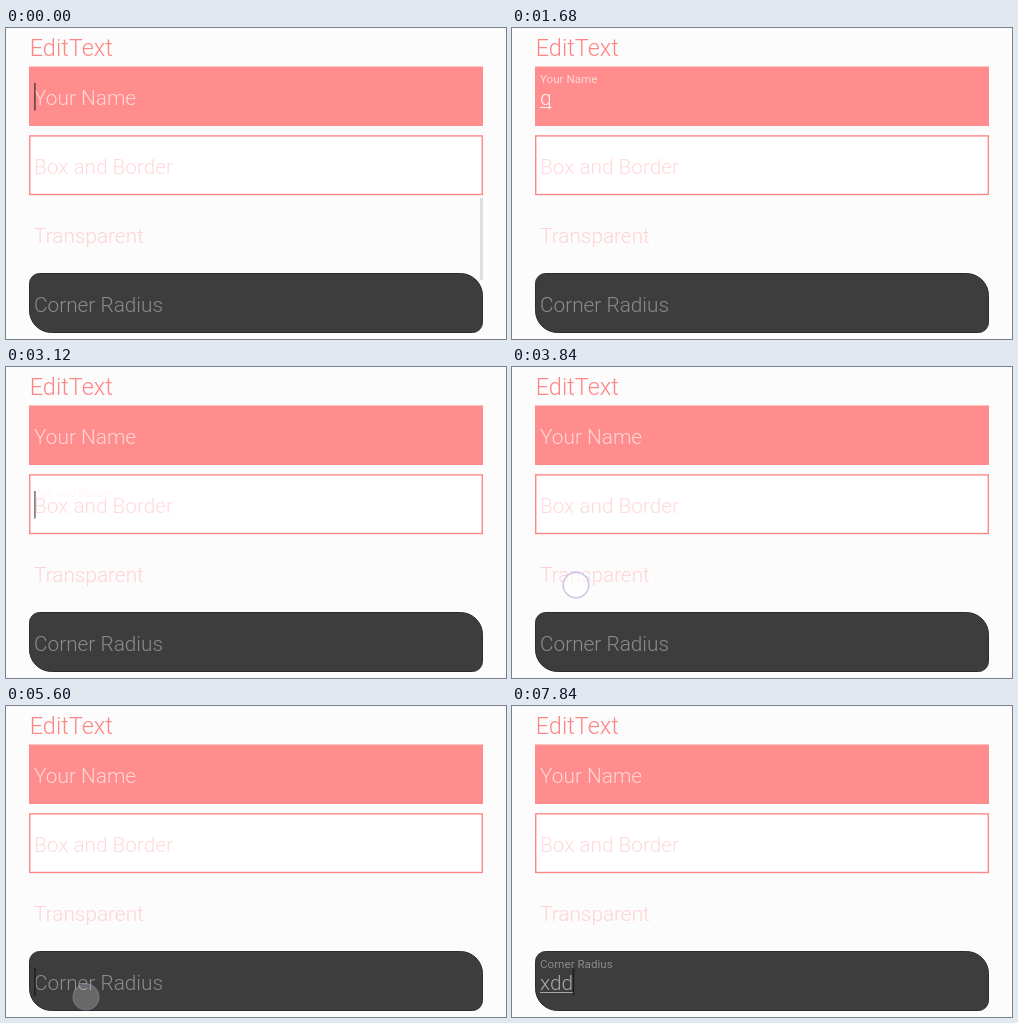
An HTML page that plays this animation: 500x311 px, repeating every 8 s.

```html
<!DOCTYPE html>
<html lang="en">
<head>
<meta charset="utf-8">
<title>EditText</title>
<style>
  html, body { margin: 0; width: 100%; height: 100%; overflow: hidden; background: #fcfcfc; }
  svg { display: block; width: 100vw; height: 100vh; }
  text { font-family: Roboto, sans-serif; font-weight: 300; font-size: 20.8px; }
  .title { font-size: 23.5px; fill: #ff8585; }
  .label { font-size: 11.6px; font-weight: 400; }
</style>
</head>
<body>
<svg id="stage" viewBox="0 0 500 311">
  <rect width="500" height="311" fill="#fcfcfc"/>
  <text class="title" x="23.7" y="27.5">EditText</text>
  <rect x="23" y="38.5" width="454" height="59.5" fill="#ff8d8d"/>
  <rect x="23.7" y="107.9" width="452.6" height="58.6" fill="#fff" stroke="#ff8787" stroke-width="1.4"/>
  <path d="M33.5 245.5H454.5a22 22 0 0 1 22 22V294.5a10 10 0 0 1 -10 10H45.500a22 22 0 0 1 -22 -22V255.500a10 10 0 0 1 10 -10Z"
        fill="#3d3d3d" stroke="#2c2c2c"/>
</svg>
<script>
const LOOP = 8000, STEP = 80, BLINK = 480, LABEL_MS = 320, TOUCH_MS = 320;
const LEFT = 28;
const stage = document.getElementById('stage');

function add(tag, attrs, content = '') {
  const el = document.createElementNS('http://www.w3.org/2000/svg', tag);
  set(el, attrs);
  el.textContent = content;
  stage.append(el);
  return el;
}

function set(el, attrs) {
  for (const key in attrs) el.setAttribute(key, attrs[key]);
}

const clamp = v => Math.max(0, Math.min(1, v));
const ease = v => 1 - (1 - v) ** 2;

const fields = [
  { hint: 'Your Name', base: 77, hintColor: '#ffd6d6', color: '#fff0f0', caret: '#4a3a3a' },
  { hint: 'Box and Border', base: 146, hintColor: '#ffd9dc', color: '#ff8d8d', caret: '#666' },
  { hint: 'Transparent', base: 215, hintColor: '#ffd2d5', color: '#ff8d8d', caret: '#666' },
  { hint: 'Corner Radius', base: 284, hintColor: '#8b8b8b', color: '#a8a8a8', caret: '#1c1c1c' }
];

for (const f of fields) {
  f.hintEl = add('text', { x: LEFT, y: f.base, fill: f.hintColor }, f.hint);
  f.labelEl = add('text', { class: 'label', x: LEFT, fill: f.hintColor }, f.hint);
  f.textEl = add('text', { x: LEFT, y: f.base, fill: f.color });
  f.lineEl = add('rect', { x: LEFT, y: f.base + 2, height: 1, fill: f.color });
}

const caret = add('rect', { width: 1.4, height: 27.5 });
const scrollbar = add('rect', { x: 474, y: 170, width: 3, height: 82, fill: '#dedede' });
const ring = add('circle', { r: 12.8, fill: '#fff', 'fill-opacity': 0.6, stroke: '#c9c5e6', 'stroke-width': 1.5 });

// [time, field, text]: every focus change or key press
const events = [
  [0, 0, ''], [1200, 0, 'q'], [1760, 0, ''],
  [2320, 1, ''], [2720, 1, 'x'], [3040, 1, ''],
  [4000, 2, ''], [4320, 2, 'x'], [4880, 2, ''],
  [5520, 3, ''], [5840, 3, 'x'], [6560, 3, 'xd'], [6720, 3, 'xdd'],
  [6880, 3, 'xddd'], [7200, 3, 'xdddd'], [7520, 3, 'xddd'], [7840, 3, 'xdd']
];

// [time, x, y]
const touches = [[2160, 63, 150], [3840, 64, 218], [5360, 80, 291]];

function drawField(f, i, t) {
  let text = '', shown = 0, changed = -LOOP;
  for (const [time, field, value] of events) {
    if (time > t || field !== i) continue;
    if (!text !== !value) changed = time;
    text = value;
  }
  const p = ease(clamp((t - changed + STEP) / LABEL_MS));
  shown = text ? p : changed < 0 ? 0 : 1 - p;
  f.hintEl.setAttribute('opacity', text ? 0 : 1);
  set(f.labelEl, { opacity: shown, y: f.base - 22 + 8 * (1 - shown) });
  f.textEl.textContent = text;
  f.width = text ? f.textEl.getComputedTextLength() : 0;
  f.lineEl.setAttribute('width', f.width);
}

function render(t) {
  fields.forEach((f, i) => drawField(f, i, t));

  const [time, active] = events.filter(e => e[0] <= t).pop();
  const f = fields[active];
  set(caret, {
    x: LEFT + f.width + (f.width ? -0.3 : 0.2),
    y: f.base - 22,
    fill: f.caret,
    opacity: (t - time) % (2 * BLINK) < BLINK ? 1 : 0
  });

  scrollbar.setAttribute('opacity', 1 - clamp((t - STEP) / 480));

  const touch = touches.find(([start]) => t >= start && t < start + TOUCH_MS);
  ring.setAttribute('opacity', 0);
  if (touch) {
    const [start, cx, cy] = touch;
    set(ring, { cx, cy, opacity: 1 - clamp((t - start - STEP) / (TOUCH_MS - STEP)) * 0.95 });
  }
}

const begin = performance.now();
function frame() {
  const t = (performance.now() - begin) % LOOP;
  render(Math.floor(t / STEP) * STEP);
  requestAnimationFrame(frame);
}
frame();
</script>
</body>
</html>
```
